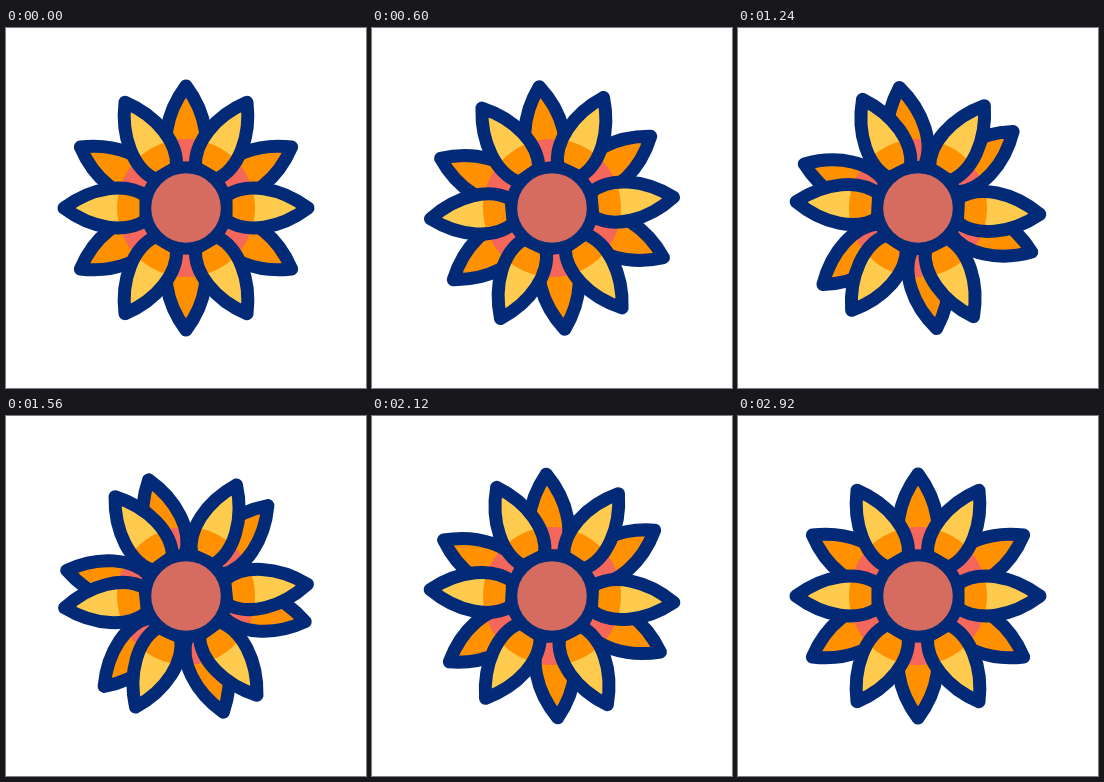
An HTML page for the animation above (3 s loop, 360x360 px).

```html
<!DOCTYPE html>
<html lang="en">
<head>
<meta charset="utf-8">
<title>Turning flower</title>
<style>
  html, body { margin: 0; height: 100%; overflow: hidden; background: #fff; }
  svg { display: block; width: 100vw; height: 100vh; }
  .line { fill: none; stroke: #032a76; stroke-width: 11.4; stroke-linejoin: round; }
  #petal .line { stroke-width: 13; }
  .front { --tip: #ffcb4f; --base: #ff9100; }
  .back { --tip: #ff9100; --base: #f5675a; }
</style>
</head>
<body>
<svg viewBox="-180 -180 360 360">
  <defs>
    <path id="leaf" d="M40 12C60 26 94 21 122 0C94 -21 60 -26 40 -12Z"/>
    <clipPath id="inner"><circle r="69"/></clipPath>
    <g id="petal">
      <use href="#leaf" style="fill: var(--tip)"/>
      <g clip-path="url(#inner)"><use href="#leaf" style="fill: var(--base)"/></g>
      <use href="#leaf" class="line"/>
    </g>
  </defs>
  <g class="back"></g>
  <g class="front"></g>
  <circle r="40.5" fill="#d66c60"/>
  <circle r="40.5" class="line"/>
</svg>
<script>
const LOOP = 3000, STEP = 40;

// Keys are [ms, degrees]: wind up, half turn with overshoot, settle.
const layers = [
  { name: 'back', offset: 30, keys: [[160, 0], [595, -6], [2400, 190], [2920, 180]] },
  { name: 'front', offset: 0, keys: [[120, 0], [515, -6.3], [2325, 190], [2900, 180]] }
];

for (const layer of layers) {
  layer.node = document.querySelector('g.' + layer.name);
  for (let i = 0; i < 6; i++) {
    const petal = document.createElementNS('http://www.w3.org/2000/svg', 'use');
    petal.setAttribute('href', '#petal');
    petal.setAttribute('transform', `rotate(${layer.offset + i * 60})`);
    layer.node.append(petal);
  }
}

const smooth = u => u * u * (3 - 2 * u);

function angleAt(keys, t) {
  if (t <= keys[0][0]) return keys[0][1];
  for (let i = 1; i < keys.length; i++) {
    const [t0, a] = keys[i - 1], [t1, b] = keys[i];
    if (t < t1) return a + (b - a) * smooth((t - t0) / (t1 - t0));
  }
  return keys[keys.length - 1][1];
}

const start = performance.now();

function draw(now) {
  const elapsed = Math.max(0, now - start) % LOOP;
  const t = Math.floor(elapsed / STEP) * STEP;
  for (const { node, keys } of layers) {
    node.setAttribute('transform', `rotate(${angleAt(keys, t)})`);
  }
  requestAnimationFrame(draw);
}
draw(start);
</script>
</body>
</html>
```
